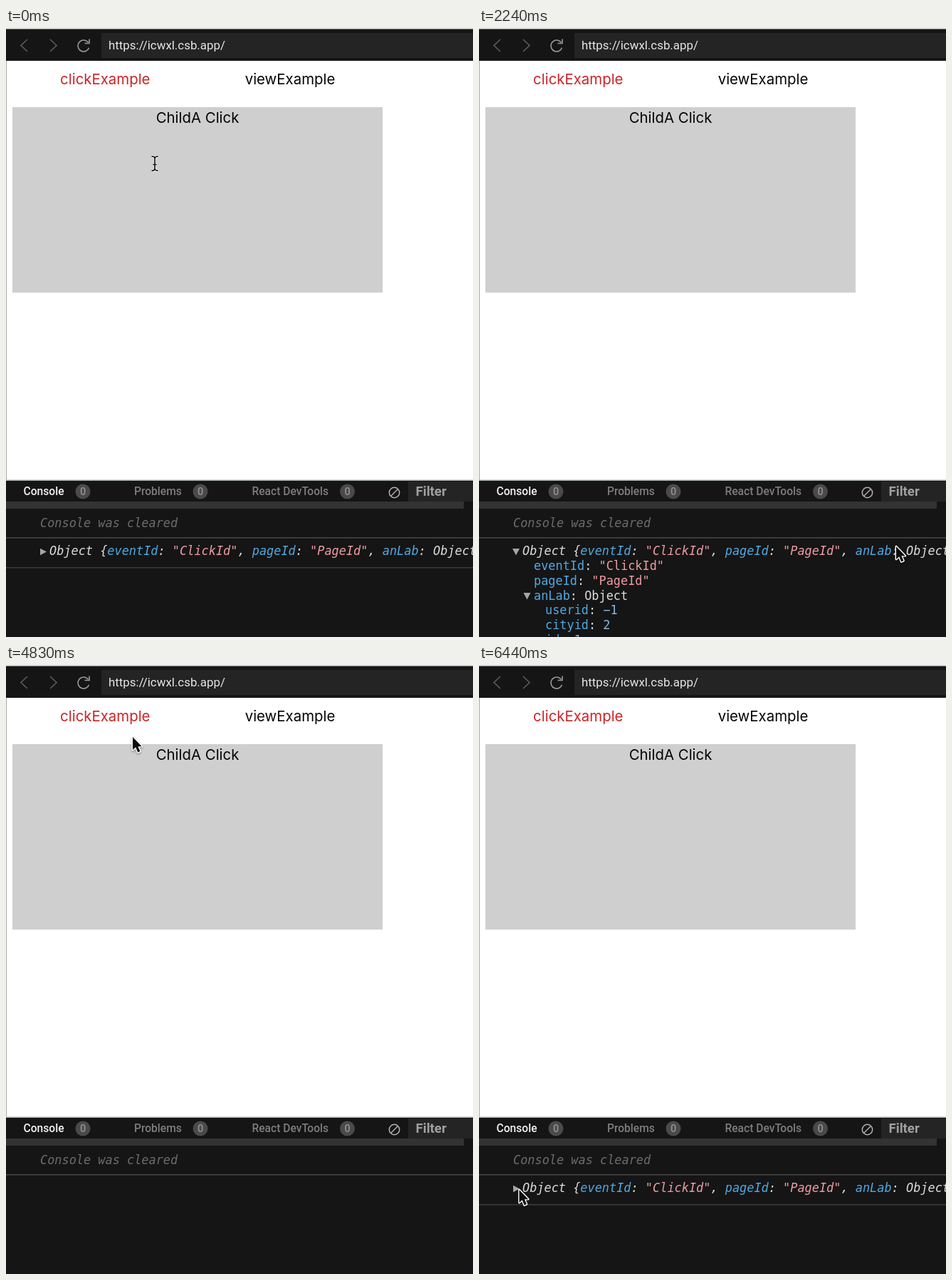
These frames come from a looping animation (656x854 px, 6580 ms). An HTML page with a canvas:

```html
<!DOCTYPE html>
<html lang="en">
<head>
<meta charset="utf-8">
<title>Click example</title>
<style>
  html, body { margin: 0; width: 100%; height: 100%; overflow: hidden; background: #151515; }
  canvas { display: block; }
</style>
</head>
<body>
<canvas id="stage" width="656" height="854"></canvas>
<script>
const ctx = document.getElementById('stage').getContext('2d');
const LOOP = 6580, STEP = 70, REPLAY = 5670;
const OPEN = 980, DEEP = 1750, CLEAR = 4480, LOG = 5460;

const UI = 'Roboto, sans-serif';
const PAGE = '20.4px Inter, sans-serif';
const MONO = '16.9px "DejaVu Sans Mono", monospace';
const KEY = '#4fa9e2', STR = '#ee9ba3', NUM = '#84b9df', PLAIN = '#dcdcdc';

// Pointer path: time, x, y
const PATH = [
  [0, 209, 190], [70, 213, 420], [140, 217, 643], [210, 190, 712],
  [280, 150, 741], [420, 95, 744], [560, 68, 739], [700, 58, 737],
  [770, 56.5, 736], [1190, 56.5, 736], [1540, 65.5, 794], [1750, 65.5, 794],
  [1960, 210, 775], [2310, 680, 715], [4130, 680, 690], [4200, 640, 675],
  [4410, 548, 655], [4480, 545, 652], [4830, 178, 101], [5250, 238, 122],
  [5670, 238, 122]
];

function pointerAt(t) {
  if (t >= REPLAY) t -= REPLAY;
  const i = PATH.findIndex(p => p[0] > t);
  const [t0, x0, y0] = PATH[i - 1], [t1, x1, y1] = PATH[i];
  const k = (t - t0) / (t1 - t0);
  return [x0 + (x1 - x0) * k, y0 + (y1 - y0) * k];
}

function rect(x, y, w, h, color) {
  ctx.fillStyle = color;
  ctx.fillRect(x, y, w, h);
}

function text(str, x, y, font, color, align = 'left') {
  ctx.font = font;
  ctx.fillStyle = color;
  ctx.textAlign = align;
  ctx.fillText(str, x, y);
}

function line(points, color, width) {
  ctx.beginPath();
  points.forEach(([x, y]) => ctx.lineTo(x, y));
  ctx.strokeStyle = color;
  ctx.lineWidth = width;
  ctx.stroke();
}

function ring(x, y, r, from, to, color, width) {
  ctx.beginPath();
  ctx.arc(x, y, r, from, to);
  ctx.strokeStyle = color;
  ctx.lineWidth = width;
  ctx.stroke();
}

// Draws [text, color] runs one after another
function runs(parts, x, y, font) {
  for (const [str, color] of parts) {
    text(str, x, y, font, color);
    x += ctx.measureText(str).width;
  }
}

function triangle(x, y, open) {
  ctx.beginPath();
  const pts = open ? [[-5, -4.5], [5, -4.5], [0, 5]] : [[-4, -4.7], [5, 0], [-4, 4.7]];
  pts.forEach(([dx, dy]) => ctx.lineTo(x + dx, y + dy));
  ctx.fillStyle = '#a5a5a5';
  ctx.fill();
}

function drawBrowser() {
  rect(0, 0, 656, 854, '#151515');
  rect(0, 0, 656, 1.5, '#dfe5e4');
  rect(134, 7, 522, 35, '#242424');
  line([[30, 16], [21, 24.5], [30, 33]], '#5d5d5d', 1.6);
  line([[62, 16], [71, 24.5], [62, 33]], '#5d5d5d', 1.6);
  ring(109, 25, 8, 0.35, 5.65, '#9a9a9a', 1.6);
  line([[117, 15.5], [117, 21.5], [110.5, 21.5]], '#9a9a9a', 1.6);
  text('https://icwxl.csb.app/', 144, 29.5, '16.9px ' + UI, '#e6e6e6');

  rect(0, 46, 656, 588, '#ffffff');
  rect(0, 46, 1, 588, '#a9a9a9');
  text('clickExample', 139.3, 79, PAGE, '#cc2428', 'center');
  text('viewExample', 399, 79, PAGE, '#050505', 'center');
  rect(9, 111, 520, 260, '#cfcfcf');
  text('ChildA Click', 269, 133.3, PAGE, '#050505', 'center');
}

function drawTabs() {
  rect(0, 633.5, 656, 1.5, '#a3aaa7');
  const tabs = [['Console', 24.5, 108, '#f2f2f2'], ['Problems', 180, 273, '#7d7d7d'],
                ['React DevTools', 345.5, 479.5, '#7d7d7d']];
  for (const [name, x, badge, color] of tabs) {
    text(name, x, 655, '500 15.6px ' + UI, color);
    ctx.beginPath();
    ctx.arc(badge, 650, 10.5, 0, 7);
    ctx.fillStyle = '#4a4a4a';
    ctx.fill();
    text('0', badge, 655, '500 14.5px ' + UI, '#929292', 'center');
  }
  ring(545.5, 651.5, 7.2, 0, 7, '#b2b2b2', 1.5);
  line([[540.5, 656.5], [550.5, 646.5]], '#b2b2b2', 1.5);
  rect(565, 636, 91, 28, '#242424');
  text('Filter', 575.5, 656.3, 'bold 18.6px ' + UI, '#a0a0a0');
  rect(0, 664, 643, 10, '#333333');
}

function field(key, value, color, x, y) {
  runs([[key, KEY], [': ', PLAIN], [value, color]], x, y, MONO);
}

function drawConsole(t) {
  text('Console was cleared', 48, 700, 'italic ' + MONO, '#6c6c6c');
  rect(0, 714, 656, 1.6, '#454545');
  if (t >= CLEAR && t < LOG) return;

  const open = t >= OPEN && t < CLEAR, deep = t >= DEEP && t < CLEAR;
  triangle(52, 734.5, open);
  runs([['Object {', PLAIN], ['eventId', KEY], [': ', PLAIN], ['"ClickId"', STR],
        [', ', PLAIN], ['pageId', KEY], [': ', PLAIN], ['"PageId"', STR],
        [', ', PLAIN], ['anLab', KEY], [': Object', PLAIN]], 61, 739.3, 'italic ' + MONO);
  if (open) {
    field('eventId', '"ClickId"', STR, 77, 760);
    field('pageId', '"PageId"', STR, 77, 780.8);
    triangle(67.5, 796.5, deep);
    field('anLab', 'Object', PLAIN, 77, 801.6);
  }
  if (deep) {
    field('userid', '\u22121', NUM, 93, 822.4);
    field('cityid', '2', NUM, 93, 843.2);
    field('id', '1', NUM, 93, 864);
  } else {
    rect(0, open ? 815.5 : 756, 656, 1.5, '#3d3d3d');
  }
}

const ARROW = new Path2D('M0 0V18L4.2 14.2L7.2 21.5L10.4 20.1L7.4 13.2H12.8Z');
const HAND = new Path2D('M-1 12V1.5Q-1 -1 1 -1Q3 -1 3 1.5V6Q5 4.8 6.2 6.5Q8.2 5.5 9.3 7.4' +
  'Q12.2 7 12.2 10V13Q12 15.5 10.5 18H1Q-1 14.5 -4.2 11Q-5.2 8.8 -3 8.6Z');
const BEAM = new Path2D('M-4.5 -10Q0 -10 0 -7Q0 -10 4.5 -10M0 -7V7M-4.5 10Q0 10 0 7Q0 10 4.5 10M-2.5 1.5H2.5');

function drawPointer(x, y) {
  if (x > 656) return;
  const overBox = x > 9 && x < 529 && y > 111 && y < 371;
  const overTab = y > 635 && y < 662 && x < 556;
  ctx.save();
  ctx.translate(x, y);
  ctx.lineJoin = 'round';
  if (overBox) {
    ctx.strokeStyle = 'rgba(255,255,255,.55)';
    ctx.lineWidth = 3.4;
    ctx.stroke(BEAM);
    ctx.strokeStyle = '#111';
    ctx.lineWidth = 1.6;
    ctx.stroke(BEAM);
  } else {
    const shape = overTab ? HAND : ARROW;
    ctx.shadowColor = 'rgba(0,0,0,.35)';
    ctx.shadowBlur = 3;
    ctx.shadowOffsetY = 1.5;
    ctx.strokeStyle = overTab ? '#111' : '#fff';
    ctx.lineWidth = overTab ? 2 : 2.8;
    ctx.stroke(shape);
    ctx.shadowColor = 'transparent';
    ctx.fillStyle = overTab ? '#fff' : '#0c0c0c';
    ctx.fill(shape);
    if (overTab) {
      for (const gap of [3, 6, 9]) line([[gap, 11], [gap, 15]], '#222', 1);
    }
  }
  ctx.restore();
}

function render(now) {
  const t = Math.floor((now % LOOP) / STEP) * STEP;
  drawBrowser();
  drawTabs();
  drawConsole(t);
  drawPointer(...pointerAt(t));
}

const start = performance.now();
function tick() {
  render(performance.now() - start);
  requestAnimationFrame(tick);
}
tick();
</script>
</body>
</html>
```
